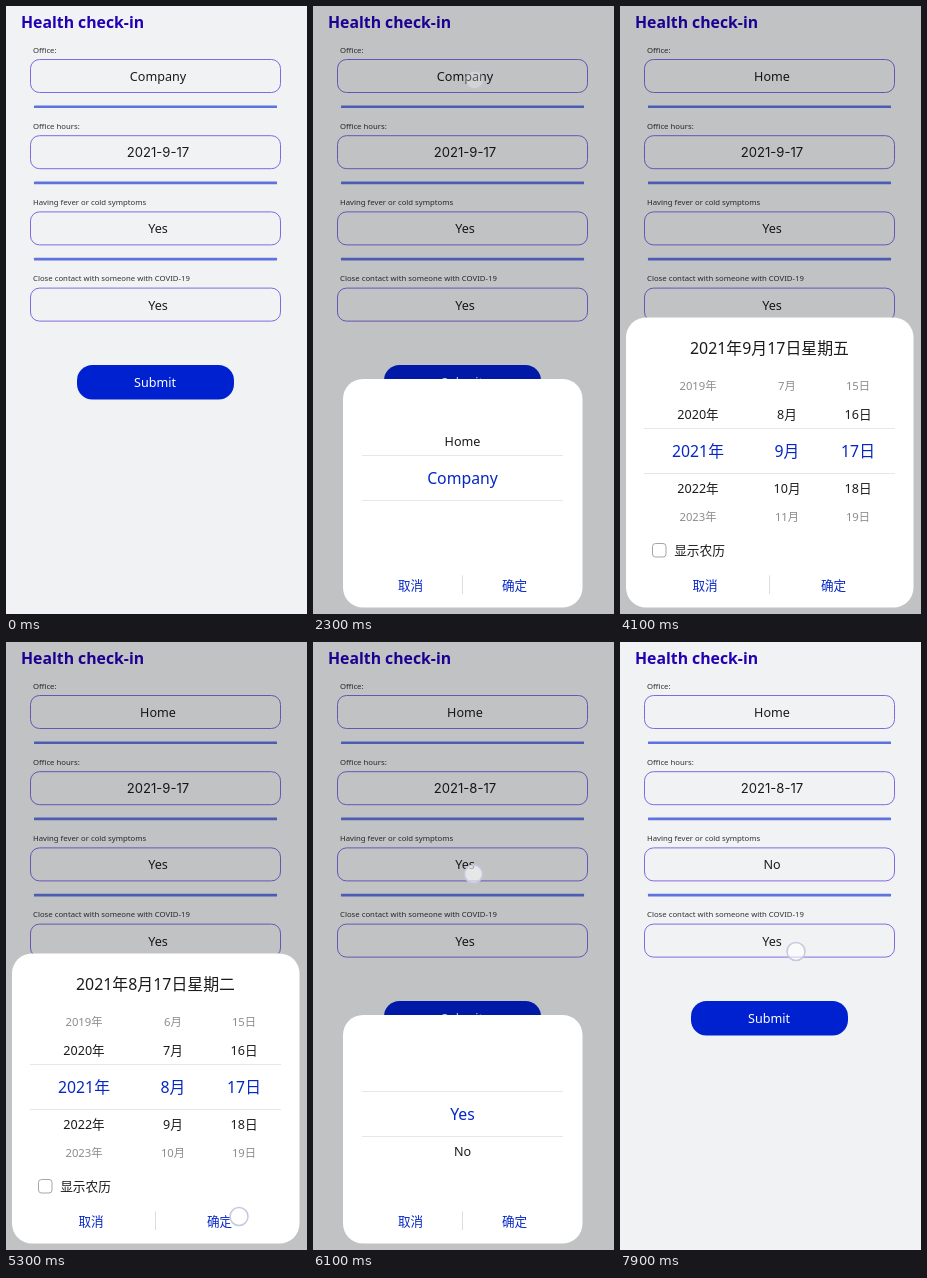
Animation, 301 px wide and 608 px high, one loop 8000 ms. Source, as an HTML page:

```html
<!DOCTYPE html>
<html lang="zh-CN">
<head>
<meta charset="utf-8">
<title>Health check-in</title>
<style>
html, body { margin: 0; width: 100%; height: 100%; overflow: hidden; background: #f1f2f4; }
svg { display: block; width: 301px; height: 608px; font-family: "Noto Sans", "Noto Sans CJK SC", "Noto Sans CJK", sans-serif; }
</style>
</head>
<body>
<svg id="stage" viewBox="0 0 301 608"></svg>
<script>
const LOOP = 8000, STEP = 100;
const INK = '#1b1b1d', BLUE = '#0527c4';
const stage = document.getElementById('stage');

// start, end, x, y and, for drags, the final x, y
const touches = [
  [1400, 1600, 229.5, 73],
  [2200, 2400, 161.5, 74],
  [2900, 3300, 150, 468, 151, 512],
  [3300, 3600, 218, 583],
  [3900, 4100, 160, 148],
  [4600, 5000, 167, 455, 168, 515],
  [5300, 5600, 233, 574.5],
  [6100, 6300, 160.5, 232],
  [6700, 7100, 152, 505, 151, 462],
  [7300, 7700, 210, 576],
  [7900, 8100, 176, 309.5]
];

const mix = (a, b, k) => a + (b - a) * k;
const progress = (t, from, to) => Math.min(1, Math.max(0, (t - from) / (to - from)));
const ease = k => k * k * (3 - 2 * k);

function text(str, x, y, size, fill = INK, extra = '') {
  return `<text x="${x}" y="${y + size * 0.365}" font-size="${size}" fill="${fill}" text-anchor="middle" ${extra}>${str}</text>`;
}

function rect(x, y, w, h, r, fill, extra = '') {
  return `<rect x="${x}" y="${y}" width="${w}" height="${h}" rx="${r}" fill="${fill}" ${extra}/>`;
}

function form(t) {
  const rows = [
    ['Office:', t < 3400 ? 'Company' : 'Home'],
    ['Office hours:', t < 5400 ? '2021-9-17' : '2021-8-17'],
    ['Having fever or cold symptoms', t < 7500 ? 'Yes' : 'No'],
    ['Close contact with someone with COVID-19', 'Yes']
  ];
  let out = text('Health check-in', 15, 16.5, 15.8, '#2300b4', 'style="text-anchor:start" font-weight="700"');
  rows.forEach(([label, value], i) => {
    const y = i * 76.2;
    const isDate = i === 1;
    out += text(label, 27, y + 44, 7.75, '#303034', 'style="text-anchor:start"');
    out += rect(24.5, y + 53.5, 250, 33, 9, 'none', 'stroke="#8468e0"');
    out += text(value, 152, y + 70.5, isDate ? 13.1 : 12.6, INK, isDate ? 'font-family="Inter, sans-serif"' : '');
    if (i < 3) out += rect(28, y + 99.4, 243, 2.6, 0.5, '#5f73df');
  });
  return out + rect(71, 359, 157, 34.5, 15.5, '#0021d0')
    + text('Submit', 149, 376.5, 12.6, '#fff', 'font-weight="500"');
}

// Row look by distance from the selected place
function wheelRow(str, x, mid, d) {
  const n = Math.abs(d);
  if (n > 2.4) return '';
  const near = Math.min(n, 1), far = Math.max(0, n - 1);
  const y = mid + Math.sign(d) * (near * 37 + far * 28.5);
  const size = mix(15.8, 12.6, near) - far * 1.3;
  const fade = Math.max(0, 1 - far * 0.5 - Math.max(0, far - 1) * 1.25);
  return text(str, x, y, size, n < 0.5 ? BLUE : INK, `opacity="${fade}" font-weight="${n < 0.5 ? 500 : 400}"`);
}

function wheel(x, mid, pos, from, to, name) {
  let out = '';
  for (let i = from; i <= to; i++) out += wheelRow(name(i), x, mid, i - pos);
  return out;
}

function panel(x, y, w, h, left, right, lineX, mid) {
  const rule = dy => rect(lineX, mid + dy, 301 - 2 * lineX - 2, 1, 0, '#e6e7e9');
  return rect(0, 0, 301, 608, 0, '#000', 'opacity=".2"')
    + rect(x, y, w, h, 20, '#fff')
    + rule(-23) + rule(22)
    + rect(149, 569.5, 1, 18.5, 0, '#dcdde0')
    + text('取消', left, 579.5, 12.6, BLUE, 'font-weight="500"')
    + text('确定', right, 579.5, 12.6, BLUE, 'font-weight="500"');
}

function listPicker(items, pos) {
  return panel(30, 373, 239.5, 228.5, 97.5, 201.5, 49, 472)
    + wheel(149.5, 472, pos, 0, items.length - 1, i => items[i]);
}

function datePicker(month) {
  const current = Math.round(month);
  const day = current === 9 ? '五' : '二';
  return panel(6, 311.5, 287.5, 290, 85, 213.5, 24, 445)
    + text(`2021年${current}月17日星期${day}`, 149.5, 342, 15.9, INK, 'font-weight="500"')
    + wheel(78, 445, 2021, 2019, 2023, i => i + '年')
    + wheel(167, 445, month, 6, 12, i => i + '月')
    + wheel(238, 445, 17, 15, 19, i => i + '日')
    + rect(32.5, 537.5, 13.5, 13.5, 3, '#fff', 'stroke="#a3a5a9"')
    + text('显示农历', 79.5, 544.5, 12.7);
}

function dialog(t) {
  if (t >= 2300 && t < 3400) return listPicker(['Home', 'Company'], 1 - ease(progress(t, 2800, 3300)));
  if (t >= 4000 && t < 5400) return datePicker(9 - ease(progress(t, 4500, 5100)));
  if (t >= 6100 && t < 7500) return listPicker(['Yes', 'No'], ease(progress(t, 6600, 7200)));
  return '';
}

function touchDot(t) {
  const touch = touches.find(([start, end]) => t >= start && t < end);
  if (!touch) return '';
  const [start, end, x, y, x2 = x, y2 = y] = touch;
  const k = progress(t, start, end - STEP);
  const alpha = t >= end - STEP ? 0.45 : 1;
  return `<circle cx="${mix(x, x2, k)}" cy="${mix(y, y2, k)}" r="9" fill="#fff" fill-opacity=".6" stroke="#c9c8de" stroke-width="1.5" opacity="${alpha}"/>`;
}

let last = -1;
function draw(now) {
  const t = Math.floor(now % LOOP / STEP) * STEP;
  if (t !== last) {
    stage.innerHTML = form(t) + dialog(t) + touchDot(t);
    last = t;
  }
}

const begin = performance.now();
function tick() {
  draw(performance.now() - begin);
  requestAnimationFrame(tick);
}
tick();
</script>
</body>
</html>
```
